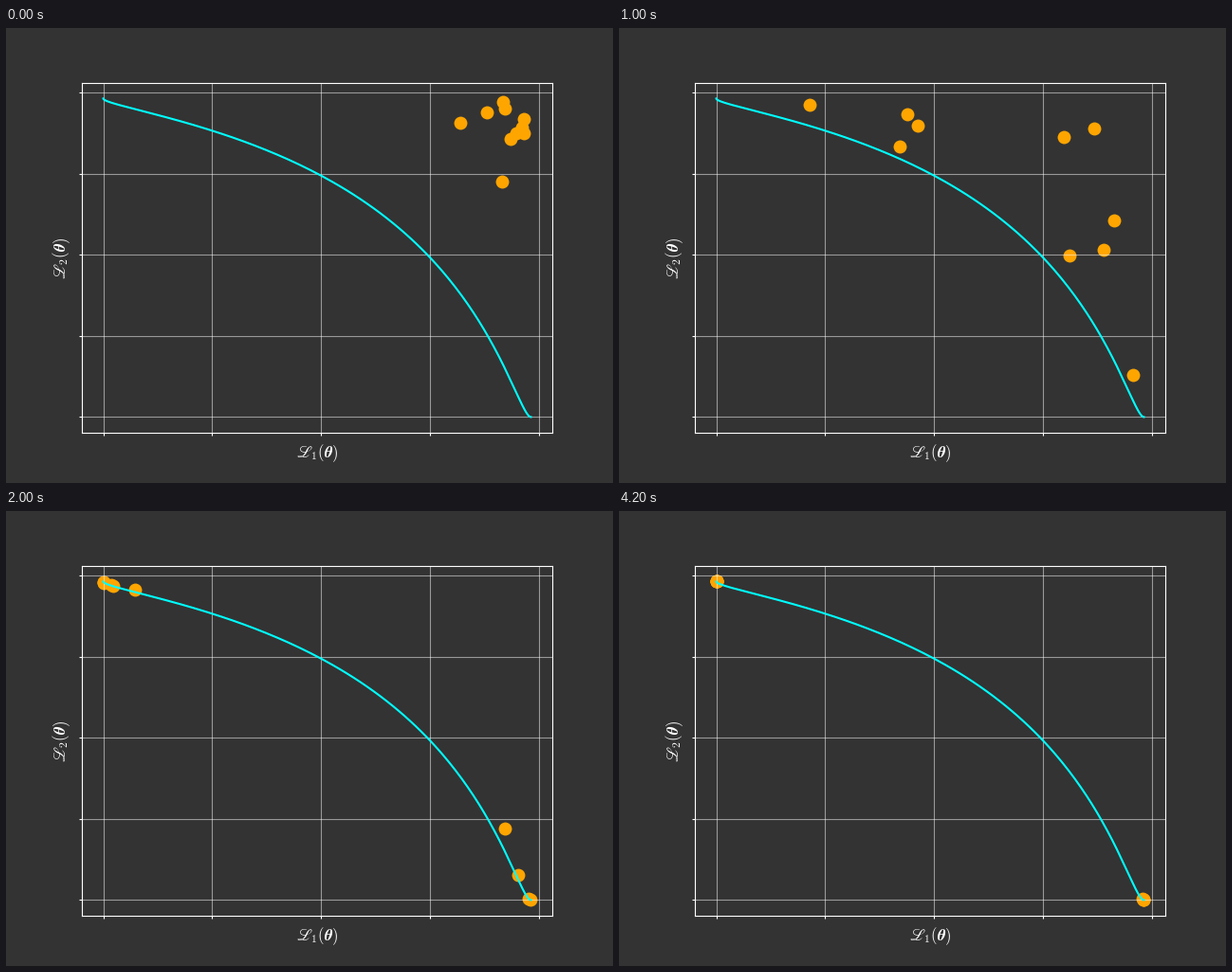
A matplotlib script for the animation above (4.3 s loop, 640 by 480 pixels).

```python
import numpy as np
import matplotlib.pyplot as plt
from matplotlib.animation import FuncAnimation

FRAMES, INTERVAL = 43, 100
BG = "#333333"
plt.rcParams["mathtext.fontset"] = "cm"

# Each particle: (u, v) along and across the axis joining the two minima,
# at the key times, then the rate at which it settles into a minimum.
KEYS = (0, 8, 13, 17)
PATHS = np.array([
    [.169, 1.011, .145, .493, .722, .135, .910, .050, .20],
    [.172, 1.203, .327, .732, .548, .362, .738, .140, .18],
    [.254, 1.388, .588, .763, .907, .137, .980, .030, .25],
    [.111, 1.322, .375, .844, .733, .319, .950, .040, .22],
    [-.210, 1.379, -.041, 1.160, .181, .890, .536, .493, .17],
    [-.248, 1.290, -.025, 1.024, .297, .676, .727, .240, .17],
    [-.312, 1.271, -.357, .902, -.413, .584, -.501, .360, .042],
    [-.220, 1.212, -.310, .760, -.464, .414, -.636, .205, .085],
    [-.198, 1.146, -.134, .565, -.595, .222, -.881, .055, .14],
    [-.297, .894, -.597, .484, -.899, .100, -.990, .020, .14],
])
POINTS = PATHS[:, :8].reshape(-1, 4, 2).transpose(1, 0, 2)
RATE = PATHS[:, 8]
LAUNCH = 2.4  # exponent of the accelerating start
SETTLE = 1.236


def losses(u, v):
    return (1 - np.exp(-(u - 1) ** 2 - v ** 2),
            1 - np.exp(-(u + 1) ** 2 - v ** 2))


def hermite(p, q, mp, mq, span, s):
    return ((2 * s**3 - 3 * s**2 + 1) * p + (3 * s**2 - 2 * s**3) * q
            + span * ((s**3 - 2 * s**2 + s) * mp + (s**3 - s**2) * mq))


def harmonic(a, b):
    same = a * b > 0
    return np.where(same, 2 * a * b / np.where(same, a + b, 1), 0)


SECANTS = [(POINTS[k + 1] - POINTS[k]) / (KEYS[k + 1] - KEYS[k])
           for k in range(3)]
SLOPES = [0, LAUNCH * SECANTS[0], harmonic(SECANTS[1], SECANTS[2]), SECANTS[2]]


def particles(t):
    if t <= KEYS[1]:
        return POINTS[0] + (POINTS[1] - POINTS[0]) * (t / KEYS[1]) ** LAUNCH
    if t < KEYS[3]:
        k = 1 if t < KEYS[2] else 2
        span = KEYS[k + 1] - KEYS[k]
        return hermite(POINTS[k], POINTS[k + 1], SLOPES[k], SLOPES[k + 1],
                       span, (t - KEYS[k]) / span)
    u, v = POINTS[3].T
    decay = np.exp(-RATE * (t - KEYS[3]) ** SETTLE)
    goal = np.sign(u)
    return np.column_stack([goal + (u - goal) * decay, v * decay ** 2])


fig = plt.figure(figsize=(6.4, 4.8), dpi=100, facecolor=BG)
ax = fig.add_axes([.125, .11, .775, .77], facecolor=BG)

front = losses(np.linspace(-1, 1, 200), 0)
top = 1 - np.exp(-4)
ax.plot(*front, color="cyan", lw=1.5)
dots = ax.scatter(*losses(*particles(0).T), s=100, color="orange", linewidths=0)

ax.set_xlim(-.05 * top, 1.05 * top)
ax.set_ylim(-.05 * top, 1.05 * top)
ticks = np.linspace(0, 1, 5)
ax.set_xticks(ticks)
ax.set_yticks(ticks)
ax.tick_params(color="white", length=2, width=.8,
               labelbottom=False, labelleft=False)
ax.grid(color="white", lw=.8, alpha=.5)
for spine in ax.spines.values():
    spine.set_color("white")


def label(x, y, index, **kw):
    fig.text(x / 640, 1 - y / 480,
             rf"$\mathscr{{L}}_{index}(\boldsymbol{{\theta}})$",
             color="white", size=12, ha="center", va="center", **kw)


label(328, 449, 1)
label(59, 242.4, 2, rotation=90)


def update(t):
    dots.set_offsets(np.column_stack(losses(*particles(t).T)))
    return (dots,)


anim = FuncAnimation(fig, update, frames=FRAMES, interval=INTERVAL,
                     repeat=True, repeat_delay=0)
plt.show()
```
